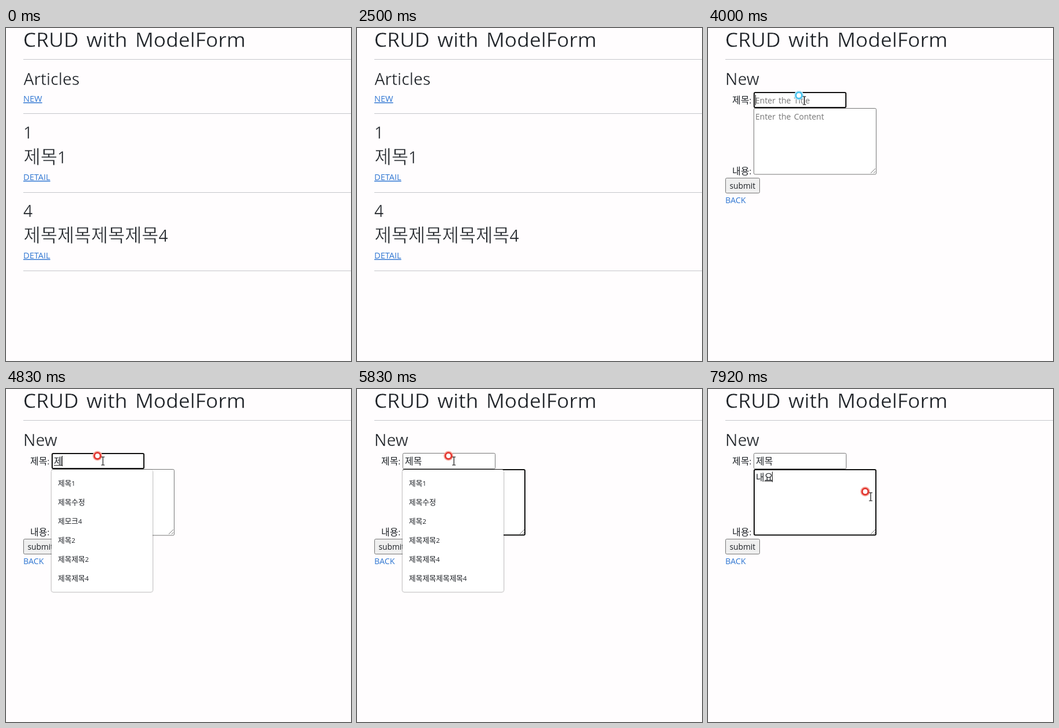
An HTML page that plays this animation: 598 px wide and 578 px high, repeating every 8 s.

```html
<!DOCTYPE html>
<html lang="ko">
<head>
<meta charset="utf-8">
<style>
  html, body { margin: 0; height: 100%; overflow: hidden; background: #fffdfe; }
  svg { display: block; }
  text { font-family: "Open Sans", "Noto Sans", sans-serif; fill: #1d2126; word-spacing: .12em; white-space: pre; }
  .ko { font-family: "Noto Sans CJK KR", "Noto Sans CJK", sans-serif; font-size: 1.12em; }
  /* A page-coloured outline thins the large letters */
  .big { stroke: #fffdfe; stroke-width: .35; }
  .big .ko { font-weight: 300; stroke-width: .6; }
  .link { fill: #2f76d2; }
  .under { text-decoration: underline; }
  .hint { fill: #757575; }
</style>
</head>
<body>
<svg id="stage" width="598" height="578" viewBox="0 0 598 578"></svg>
<script>
const LOOP = 8000;
const stage = document.getElementById('stage');

const text = (x, y, size, str, cls = '') =>
  `<text x="${x}" y="${y}" font-size="${size}" class="${cls}">` +
  str.replace(/[ㄱ-ㅎ가-힣]+/g, '<tspan class="ko">$&</tspan>') + '</text>';
const heading = (x, y, str, size = 28.4) => text(x, y, size, str, 'big');
const rule = y => `<path d="M30 ${y + .5}H598" stroke="#c4c6ca"/>`;
const box = (x, y, w, h, focused, fill = '#fff') => {
  const line = focused ? 2 : 1;
  return `<rect x="${x + line / 2}" y="${y + line / 2}" width="${w - line}" height="${h - line}" rx="2"
    fill="${fill}" stroke="${focused ? '#101010' : '#767676'}" stroke-width="${line}"/>`;
};

// The last entry whose start time has passed: [time, ...values]
const latest = (track, t) => track.filter(step => step[0] <= t).pop();

const titleTyping = [[0, ''], [4420, 'ㅈ'], [4580, '제'], [5170, '젬'], [5330, '제모'], [5500, '제목']];
const contentTyping = [[0, ''], [7420, 'ㄴ'], [7580, '내'], [7670, '냉'], [7830, '내요']];
const suggestions = [
  [0, '제목1', '제목수정', '제모크4', '제목2', '제목제목2', '제목제목4'],
  [5500, '제목1', '제목수정', '제목2', '제목제목2', '제목제목4', '제목제목제목제목4']
];
const pointerPath = [
  [2830, 604, 230], [3250, 48, 124], [3500, 48, 124], [3830, 167, 126], [4170, 167, 126],
  [4250, 168, 125], [6500, 168, 125], [6830, 281, 187], [7250, 281, 187], [7330, 282, 187]
];

function listPage() {
  const article = (y, id, title) =>
    heading(30, y, id) + heading(30.5, y + 42.5, title) +
    text(30, y + 72, 14.6, 'DETAIL', 'link under') + rule(y + 93);
  return heading(30.5, 98.5, 'Articles') + text(30, 128, 14.6, 'NEW', 'link under') + rule(148) +
    article(192, '1', '제목1') + article(328, '4', '제목제목제목제목4');
}

// Field contents with the composing underline and the blinking caret
function field(x, y, [start, value], hint, focused, since, t) {
  const glyph = 14.6, end = x + value.length * glyph;
  let out = value ? text(x, y, 14.3, value) : text(x - 1, y, 14, hint, 'hint');
  if (focused && value)
    out += `<path d="M${end - glyph} ${y + 1.5}H${end}" stroke="#222"/>`;
  if (focused && (t - Math.max(start, since)) % 1060 < 530)
    out += `<path d="M${Math.round(end) - .5} ${y - 15}v18" stroke="#111"/>`;
  return out;
}

function dropdown(t) {
  const rows = latest(suggestions, t).slice(1);
  return [4, 2.5, 1].map((w, i) =>
      `<rect x="79" y="141" width="175" height="211" rx="3" fill="none" stroke="#000"
        stroke-opacity="${.04 + i * .06}" stroke-width="${w}"/>`).join('') +
    '<rect x="79" y="140" width="175" height="212" rx="3" fill="#fff"/>' +
    rows.map((row, i) => text(90, 168 + 33 * i, 11.4, row)).join('');
}

function formPage(t) {
  const onContent = t >= 5750;
  return heading(30, 98.5, 'New') + text(42, 131, 14.3, '제목:') + text(42, 254, 14.3, '내용:') +
    box(79, 111, 161, 28, !onContent) + box(79, 139, 213, 115.5, onContent) +
    '<path d="M282 252l8-8M287 252l3-3" stroke="#777"/>' +
    field(83, 131, latest(titleTyping, t), 'Enter the Title', !onContent, 3900, t) +
    field(83, 158.5, latest(contentTyping, t), 'Enter the Content', onContent, 6830, t) +
    box(30, 260, 60, 27, false, '#efefef') + text(37.5, 279, 13.8, 'submit') +
    text(30, 303.5, 14.3, 'BACK', 'link') +
    (t >= 4250 && t < 6830 ? dropdown(t) : '');
}

function pointerAt(t) {
  const i = pointerPath.findLastIndex(p => p[0] <= t);
  const [t0, x0, y0] = pointerPath[i], [t1, x1, y1] = pointerPath[i + 1] || [LOOP, x0, y0];
  const k = (t - t0) / (t1 - t0), ease = k * k * (3 - 2 * k);
  return [x0 + (x1 - x0) * ease, y0 + (y1 - y0) * ease];
}

function pointer(t) {
  if (t < 2830) return '';
  const [x, y] = pointerAt(t);
  const korean = (t >= 4170 && t < 6600) || t >= 7330;
  const [color, halo] = korean ? ['#e2352f', '#f7b0a5'] : ['#48c3ee', '#bfeafa'];
  const beam = t > 3720;
  const shape = beam
    ? '<path d="M-3-7h2.5l.5.5.5-.5H3M0-6.5v13M-3 7h2.5l.5-.5.5.5H3" fill="none" stroke="#111" stroke-width="1.2"/>'
    : '<path d="M0 0v16l4-4 3 6 2.5-1-3-6h5.5z" fill="#fff" stroke="#111"/>';
  return `<g transform="translate(${x} ${y})">
    <g transform="translate(-9.5 -9)" fill="none">
      <circle r="6" stroke="${halo}" stroke-width="5" ${korean ? '' : 'stroke-dasharray="2.2 .94"'}/>
      <circle r="5.3" fill="#fff" stroke="${color}" stroke-width="2.8"/>
    </g>${shape}</g>`;
}

function frame(now) {
  const t = now % LOOP;
  stage.innerHTML = heading(29.8, 33.3, 'CRUD with ModelForm', 35.5) + rule(54) +
    (t < 3500 ? listPage() : formPage(t)) + pointer(t);
  requestAnimationFrame(frame);
}
requestAnimationFrame(frame);
</script>
</body>
</html>
```
